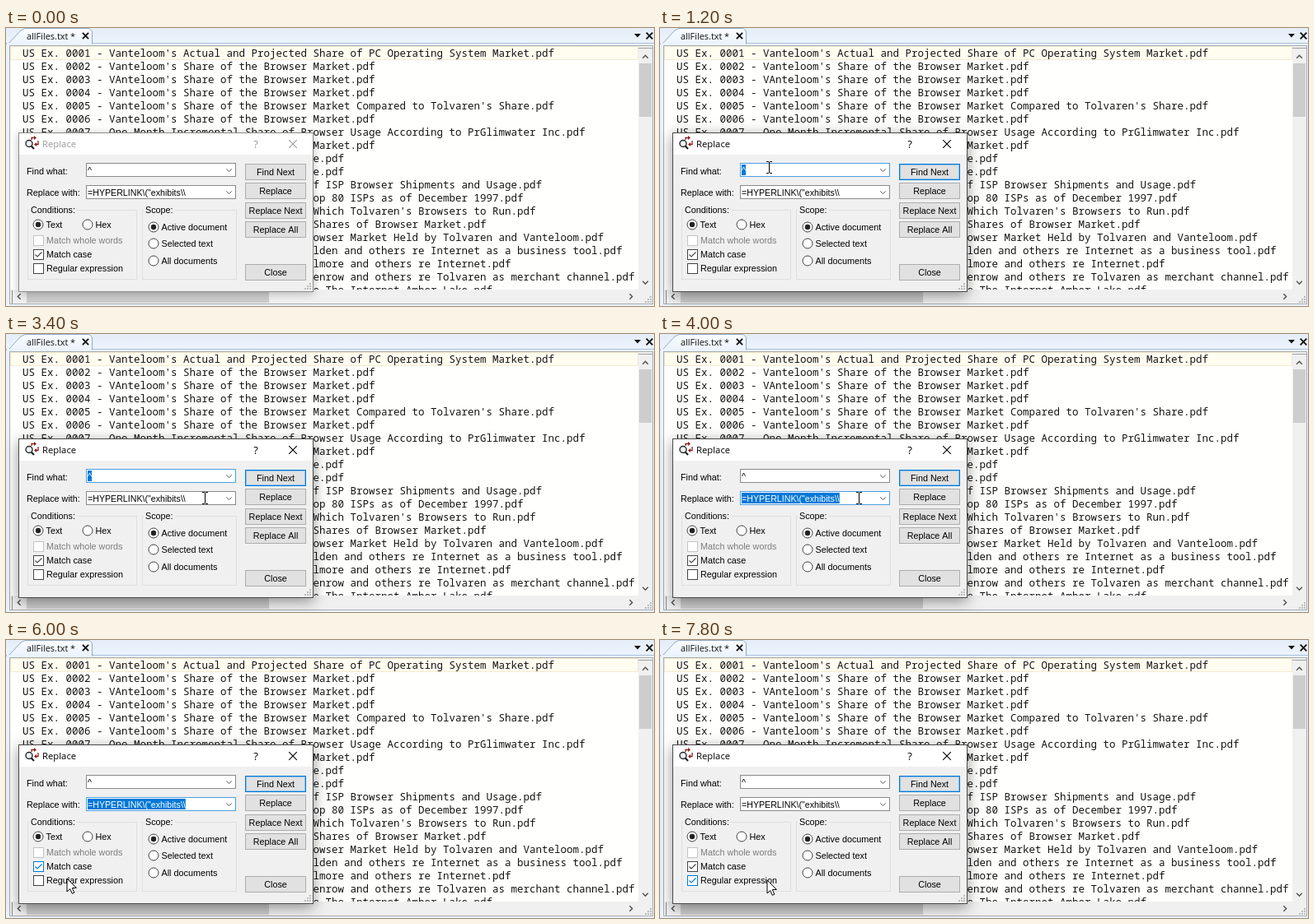
Write an HTML page with a canvas that moves like this. It is 786 by 338 pixels and loops after 8000 ms.

```html
<!DOCTYPE html>
<html lang="en">
<head>
<meta charset="utf-8">
<title>Replace dialog</title>
<style>
  html, body { margin: 0; width: 100%; height: 100%; overflow: hidden; background: #fff; }
  canvas { display: block; width: 786px; height: 338px; }
</style>
</head>
<body>
<canvas id="stage" width="786" height="338"></canvas>
<script>
const ctx = document.getElementById('stage').getContext('2d');
const LOOP = 8000, STEP = 200;
const MONO = '12.5px "Noto Sans Mono", monospace';
const SANS = '10.8px "Liberation Sans", sans-serif';
const FIELD = '10.65px "Liberation Sans", sans-serif';
const TITLE = '11.3px "Open Sans", sans-serif';
const BLUE = '#0078d7', SOFT_BLUE = '#4aa0e3';

const topLines = [
  "Vanteloom's Actual and Projected Share of PC Operating System Market",
  "Vanteloom's Share of the Browser Market",
  "VAnteloom's Share of the Browser Market",
  "Vanteloom's Share of the Browser Market",
  "Vanteloom's Share of the Browser Market Compared to Tolvaren's Share",
  "Vanteloom's Share of the Browser Market",
  "One Month Incremental Share of Browser Usage According to PrGlimwater Inc"
];
// Parts of the lower lines that stick out beside the dialog
const sideLines = [
  "Market", "e", "e",
  "f ISP Browser Shipments and Usage",
  "op 80 ISPs as of December 1997",
  "Which Tolvaren's Browsers to Run",
  "Shares of Browser Market",
  "owser Market Held by Tolvaren and Vanteloom",
  "lden and others re Internet as a business tool",
  "lmore and others re Internet",
  "enrow and others re Tolvaren as merchant channel",
  "e The Internet Amber Lake"
];

function rect(x, y, w, h, fill, stroke) {
  if (fill) { ctx.fillStyle = fill; ctx.fillRect(x, y, w, h); }
  if (stroke) {
    ctx.strokeStyle = stroke;
    ctx.lineWidth = 1;
    ctx.strokeRect(x + .5, y + .5, w - 1, h - 1);
  }
}

function text(str, x, y, font = SANS, color = '#000', align = 'left') {
  ctx.font = font;
  ctx.fillStyle = color;
  ctx.textAlign = align;
  ctx.fillText(str, x, y);
}

function poly(points, stroke, width = 1, fill, close) {
  ctx.beginPath();
  points.forEach(([x, y], i) => i ? ctx.lineTo(x, y) : ctx.moveTo(x, y));
  if (close) ctx.closePath();
  if (fill) { ctx.fillStyle = fill; ctx.fill(); }
  if (stroke) { ctx.strokeStyle = stroke; ctx.lineWidth = width; ctx.stroke(); }
}

function circle(x, y, r, fill, stroke, width = 1) {
  ctx.beginPath();
  ctx.arc(x, y, r, 0, Math.PI * 2);
  if (fill) { ctx.fillStyle = fill; ctx.fill(); }
  if (stroke) { ctx.strokeStyle = stroke; ctx.lineWidth = width; ctx.stroke(); }
}

function cross(x, y, r, color, width) {
  poly([[x - r, y - r], [x + r, y + r]], color, width);
  poly([[x + r, y - r], [x - r, y + r]], color, width);
}

function chevron(x, y, dx, dy, size, color, width) {
  poly([[x - dx * size / 2 - dy * size, y - dy * size / 2 - dx * size],
        [x + dx * size / 2, y + dy * size / 2],
        [x - dx * size / 2 + dy * size, y - dy * size / 2 + dx * size]], color, width);
}

function grip(right, bottom) {
  for (let row = 0; row < 3; row++)
    for (let col = 0; col <= row; col++)
      rect(right - 2 - col * 3, bottom - 8 + row * 3, 2, 2, '#bcbcbc');
}

function drawTabs() {
  rect(0, 0, 786, 338, '#ebf3fc');
  const strip = ctx.createLinearGradient(0, 0, 0, 20);
  strip.addColorStop(0, '#e4edf8');
  strip.addColorStop(1, '#edf4fc');
  rect(0, 0, 786, 19, strip);
  rect(0, 18, 786, 1, '#a9c0dc');
  const tab = ctx.createLinearGradient(0, 0, 0, 20);
  tab.addColorStop(0, '#fafdff');
  tab.addColorStop(1, '#ebf3fc');
  poly([[0, 19.5], [4, 18], [18, 3], [23, .5], [101, .5], [104.5, 4], [104.5, 19.5]], '#8fa9c8', 1, tab);
  rect(1, 18, 103, 3, '#ebf3fc');
  text('allFiles.txt *', 25, 14, '10.9px "Open Sans", sans-serif', '#111');
  cross(96.5, 9.5, 3.6, '#111', 1.9);
  poly([[762, 7], [770, 7], [766, 11.5]], null, 0, '#111', true);
  cross(780.5, 9.5, 3.8, '#111', 1.9);
}

function drawEditor() {
  rect(4, 21, 781, 315, '#fffffd', '#a6abb2');
  rect(5, 22, 762, 17, '#fffcf0', '#f6ead0');
  ctx.save();
  ctx.beginPath();
  ctx.rect(5, 22, 762, 296);
  ctx.clip();
  topLines.forEach((s, i) => text(`US Ex. 000${i + 1} - ${s}.pdf`, 20, 34.5 + i * 16, MONO, '#141414'));
  sideLines.forEach((s, i) => text(s + '.pdf', 372.5, 146.5 + i * 16, MONO, '#141414'));
  ctx.restore();

  rect(767, 22, 17, 296, '#f0f0f0');
  rect(767, 24, 17, 1, '#a0a0a0');
  rect(768, 43, 15, 65, '#cdcdcd');
  chevron(775.5, 35, 0, -1, 3.3, '#505050', 1.4);
  chevron(775.5, 309.5, 0, 1, 3.3, '#505050', 1.4);

  rect(5, 318, 779, 17, '#f0f0f0');
  rect(7, 319, 1, 16, '#8a8a8a');
  rect(25, 319, 294, 15, '#cdcdcd');
  chevron(16, 326.5, -1, 0, 3.3, '#505050', 1.4);
  chevron(758, 326.5, 1, 0, 3.3, '#505050', 1.4);
  grip(783, 334);
}

function drawIcon() {
  circle(28, 140.5, 4, '#eef4fa', '#222', 1.4);
  poly([[30.7, 143.5], [34, 147]], '#222', 2.2);
  const red = '#8e1b1b';
  poly([[31, 136], [31, 133.5], [35, 133.5]], red, 1.3);
  poly([[34, 131], [37, 133.5], [34, 136]], null, 0, red, true);
  poly([[39, 137], [39, 141.5], [36, 141.5]], red, 1.3);
  poly([[37, 139], [34, 141.5], [37, 144]], null, 0, red, true);
}

function field(y, str, focused, selected) {
  rect(97, y, 182, 17, '#fff', focused ? SOFT_BLUE : '#8a8a8a');
  chevron(270.5, y + 9, 0, 1, 3.3, '#555', 1);
  if (selected) {
    ctx.font = FIELD;
    rect(99, y + 2, ctx.measureText(str).width, 13, BLUE);
  }
  text(str, 99, y + 12.5, FIELD, selected ? '#fff' : '#000');
}

function button(label, y, isDefault) {
  rect(290, y, 74, 20, '#e1e1e1', isDefault ? BLUE : '#adadad');
  if (isDefault) rect(291, y + 1, 72, 18, null, '#8cc0ea');
  text(label, 327, y + 14, SANS, '#000', 'center');
}

function radio(label, x, y, on) {
  circle(x, y, 6, '#fff', '#444');
  if (on) circle(x, y, 3.2, '#222');
  text(label, x + 9.5, y + 4);
}

function checkbox(label, y, { on, hot, pressed, disabled }) {
  const ink = disabled ? '#c4c4c4' : hot ? BLUE : '#444';
  rect(33, y - 6, 13, 13, pressed ? '#cce4f7' : '#fff', ink);
  if (on) poly([[35.5, y + .5], [38, y + 3], [43.5, y - 2.5]], ink, 1.1);
  text(label, 49, y + 4, SANS, disabled ? '#7d7d7d' : '#000');
}

function group(label, x, w) {
  rect(x, 221, w, 85, null, '#dfdfdf');
  ctx.font = SANS;
  rect(x + 2, 216, ctx.measureText(label).width + 4, 11, '#f0f0f0');
  text(label, x + 4, 225);
}

function drawDialog(t) {
  const active = t >= 1200;
  const inFirst = active && t < 4000;
  const inSecond = t >= 4000 && t < 6600;

  ctx.save();
  ctx.shadowColor = active ? 'rgba(0,0,0,.42)' : 'rgba(0,0,0,.25)';
  ctx.shadowBlur = active ? 16 : 10;
  ctx.shadowOffsetY = active ? 4 : 2;
  rect(15, 127, 358, 194, '#f0f0f0');
  ctx.restore();
  rect(16, 128, 356, 26, '#fff');
  rect(15, 127, 358, 194, null, active ? '#4c4c4c' : '#8c8c8c');

  drawIcon();
  const ink = active ? '#000' : '#999';
  text('Replace', 44, 145, TITLE, ink);
  text('?', 303, 146, '13px "Open Sans", sans-serif', ink, 'center');
  cross(348, 141, 4.8, ink, 1.1);

  text('Find what:', 25, 178);
  text('Replace with:', 25, 203.5);
  field(164, '^', inFirst, inFirst);
  field(191, '=HYPERLINK\\("exhibits\\\\', inSecond || t === 6600, inSecond);
  if (t >= 4200 && t < 4600) rect(217, 192, 1, 13, '#000');

  button('Find Next', 165, active);
  button('Replace', 188);
  button('Replace Next', 212);
  button('Replace All', 235);
  button('Close', 287);

  group('Conditions:', 26, 133);
  group('Scope:', 165, 115);
  radio('Text', 39, 239, true);
  radio('Hex', 99, 239);
  radio('Active document', 179, 242, true);
  radio('Selected text', 179, 262);
  radio('All documents', 179, 283);
  checkbox('Match whole words', 258, { disabled: true });
  checkbox('Match case', 275, { on: true, hot: t >= 5800 && t <= 6000 });
  checkbox('Regular expression', 292, { on: t >= 6800, hot: t >= 6200, pressed: t === 6600 });
  grip(370, 318);
}

// Pointer stops: time, x, y
const path = [
  [1200, 132, 169], [2000, 132, 169], [3000, 108, 175], [3400, 241, 199],
  [5000, 241, 199], [5400, 190, 226], [5800, 88, 276], [6000, 74, 290],
  [6400, 41, 294], [7200, 41, 294], [7800, 130, 292]
];

function pointerAt(t) {
  const i = path.findIndex(p => p[0] > t);
  if (i < 0) return path[path.length - 1].slice(1);
  const [t0, x0, y0] = path[i - 1], [t1, x1, y1] = path[i];
  const u = (t - t0) / (t1 - t0), k = u * u * (3 - 2 * u);
  return [x0 + (x1 - x0) * k, y0 + (y1 - y0) * k];
}

function drawPointer(t) {
  if (t < 1200) return;
  const [x, y] = pointerAt(t).map(Math.round);
  if (t < 5200) {
    rect(x, y - 6, 1, 13, '#000');
    for (const end of [y - 7, y + 7]) {
      rect(x - 3, end, 3, 1, '#000');
      rect(x + 1, end, 3, 1, '#000');
    }
    return;
  }
  const shape = [[0, 0], [0, 16], [3.7, 12.6], [6.3, 18.3], [8.8, 17.2], [6.3, 11.6], [11.4, 11.4]];
  poly(shape.map(([a, b]) => [x + a, y + b]), '#000', 1, '#fff', true);
}

function draw(now) {
  const t = Math.floor(now % LOOP / STEP) * STEP;
  drawTabs();
  drawEditor();
  drawDialog(t);
  drawPointer(t);
  requestAnimationFrame(draw);
}

draw(0);
</script>
</body>
</html>
```
